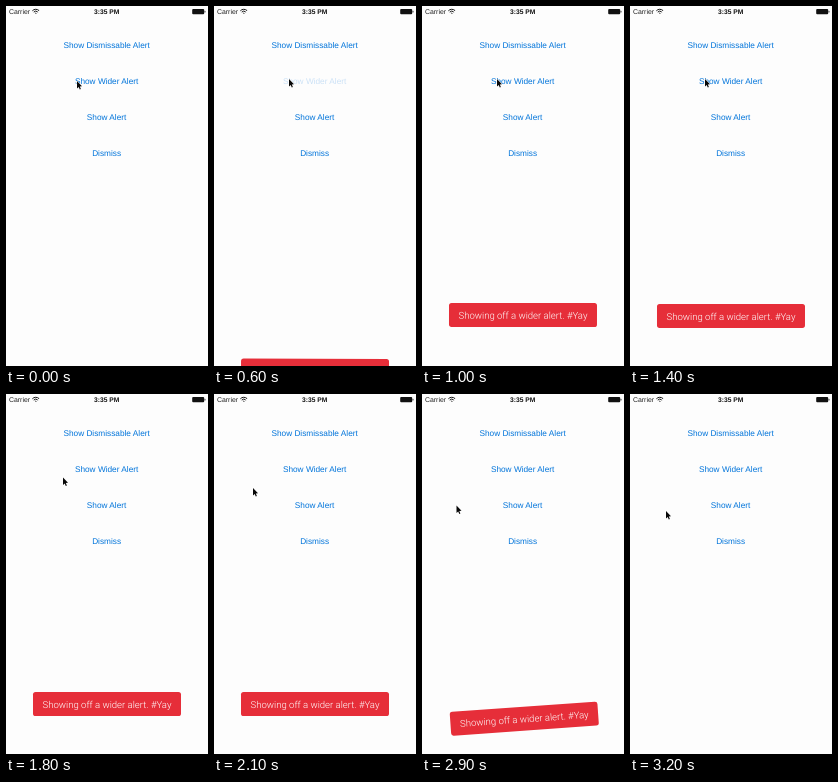
These frames come from a looping animation (202 by 360 pixels, 3300 ms). An HTML page with a canvas:

```html
<!DOCTYPE html>
<html lang="en">
<head>
<meta charset="utf-8">
<title>Alert demo</title>
<style>
  html, body { margin: 0; width: 100%; height: 100%; overflow: hidden; background: #fdfdfd; }
  canvas { display: block; width: 202px; height: 360px; }
</style>
</head>
<body>
<canvas id="stage"></canvas>
<script>
const W = 202, H = 360, LOOP = 3300, STEP = 100;
const SANS = '"Liberation Sans", Arial, sans-serif';
const LIGHT = '300 9.55px Roboto, "Open Sans", sans-serif';
const canvas = document.getElementById('stage');
const ctx = canvas.getContext('2d');
const dpr = window.devicePixelRatio || 1;
canvas.width = W * dpr;
canvas.height = H * dpr;
ctx.textRendering = 'geometricPrecision';

const buttons = [
  ['Show Dismissable Alert', 42],
  ['Show Wider Alert', 78],
  ['Show Alert', 114],
  ['Dismiss', 150]
];

// [time, x, y] of the pointer tip
const pointerPath = [
  [0, 71, 75], [200, 75, 73], [1500, 75, 73],
  [2100, 39, 94], [2600, 33, 106], [3200, 36, 117], [3300, 36, 117]
];

// [time, opacity] of the pressed button
const pressPath = [[0, 1], [399, 1], [400, 0.2], [600, 0.2], [900, 1], [3300, 1]];

// Alert physics in pixels, seconds and radians
const REST = 298, SHOW = 550, DISMISS = 2580;

function sample(path, t) {
  let i = 1;
  while (i < path.length - 1 && path[i][0] < t) i++;
  const a = path[i - 1], b = path[i];
  const p = (t - a[0]) / (b[0] - a[0]);
  const eased = p * p * (3 - 2 * p);
  return a.slice(1).map((v, k) => v + (b[k + 1] - v) * eased);
}

function text(str, x, y, font, color, align = 'center') {
  ctx.font = font;
  ctx.fillStyle = color;
  ctx.textAlign = align;
  ctx.fillText(str, x, y);
}

function fillBox(x, y, w, h, r, color) {
  ctx.fillStyle = color;
  ctx.beginPath();
  ctx.roundRect(x, y, w, h, r);
  ctx.fill();
}

function statusBar() {
  text('Carrier', 3, 8, '6.9px ' + SANS, '#222', 'left');
  text('3:35 PM', 100.7, 8, 'bold 6.7px ' + SANS, '#111');

  ctx.strokeStyle = '#111';
  ctx.lineWidth = 1;
  for (const r of [0.8, 2.8, 4.7]) {
    ctx.beginPath();
    ctx.arc(29.8, 8, r, -Math.PI * 0.76, -Math.PI * 0.24);
    ctx.stroke();
  }

  fillBox(186.2, 3, 12, 5.2, 1, '#111');
  fillBox(198.6, 4.7, 0.8, 1.9, 0.4, '#111');
}

// Springs into place, later is nudged upward and drops away while turning
function alertPose(t) {
  if (t < DISMISS) {
    const s = (t - SHOW) / 1000, k = 7.5, w = 11;
    const decay = Math.exp(-k * s), swing = Math.cos(w * s);
    return {
      x: 101,
      y: REST + 66 * decay * (swing + k / w * Math.sin(w * s)),
      tilt: 0.036 * decay * (1 - swing)
    };
  }
  const s = (t - DISMISS) / 1000;
  return { x: 101 + 4 * s, y: REST - 55 * s + 315 * s * s, tilt: -0.22 * s };
}

function alertBox(t) {
  if (t < SHOW) return;
  const { x, y, tilt } = alertPose(t);
  ctx.save();
  ctx.translate(x, y + 12);
  ctx.rotate(tilt);
  fillBox(-74, -12, 148, 24, 2.6, '#e62e39');
  text('Showing off a wider alert. #Yay', 0, 3.7, LIGHT, '#fff');
  ctx.restore();
}

function pointer(x, y) {
  const shape = [[0, 0], [0, 7.4], [1.7, 5.9], [2.8, 8.4], [3.9, 7.9], [2.8, 5.5], [5, 5.3]];
  ctx.beginPath();
  shape.forEach(([dx, dy]) => ctx.lineTo(x + dx, y + dy));
  ctx.closePath();
  ctx.lineJoin = 'round';
  ctx.lineWidth = 1;
  ctx.strokeStyle = '#fff';
  ctx.stroke();
  ctx.fillStyle = '#080808';
  ctx.fill();
}

function draw(t) {
  ctx.setTransform(dpr, 0, 0, dpr, 0, 0);
  ctx.fillStyle = '#fdfdfd';
  ctx.fillRect(0, 0, W, H);
  statusBar();
  buttons.forEach(([label, y], i) => {
    ctx.globalAlpha = i === 1 ? sample(pressPath, t)[0] : 1;
    text(label, 100.6, y, '8.28px ' + SANS, '#0074da');
  });
  ctx.globalAlpha = 1;
  alertBox(t);
  pointer(...sample(pointerPath, t));
}

const start = performance.now();
function tick() {
  const t = (performance.now() - start) % LOOP;
  draw(Math.floor(t / STEP) * STEP);
  requestAnimationFrame(tick);
}
tick();
</script>
</body>
</html>
```
